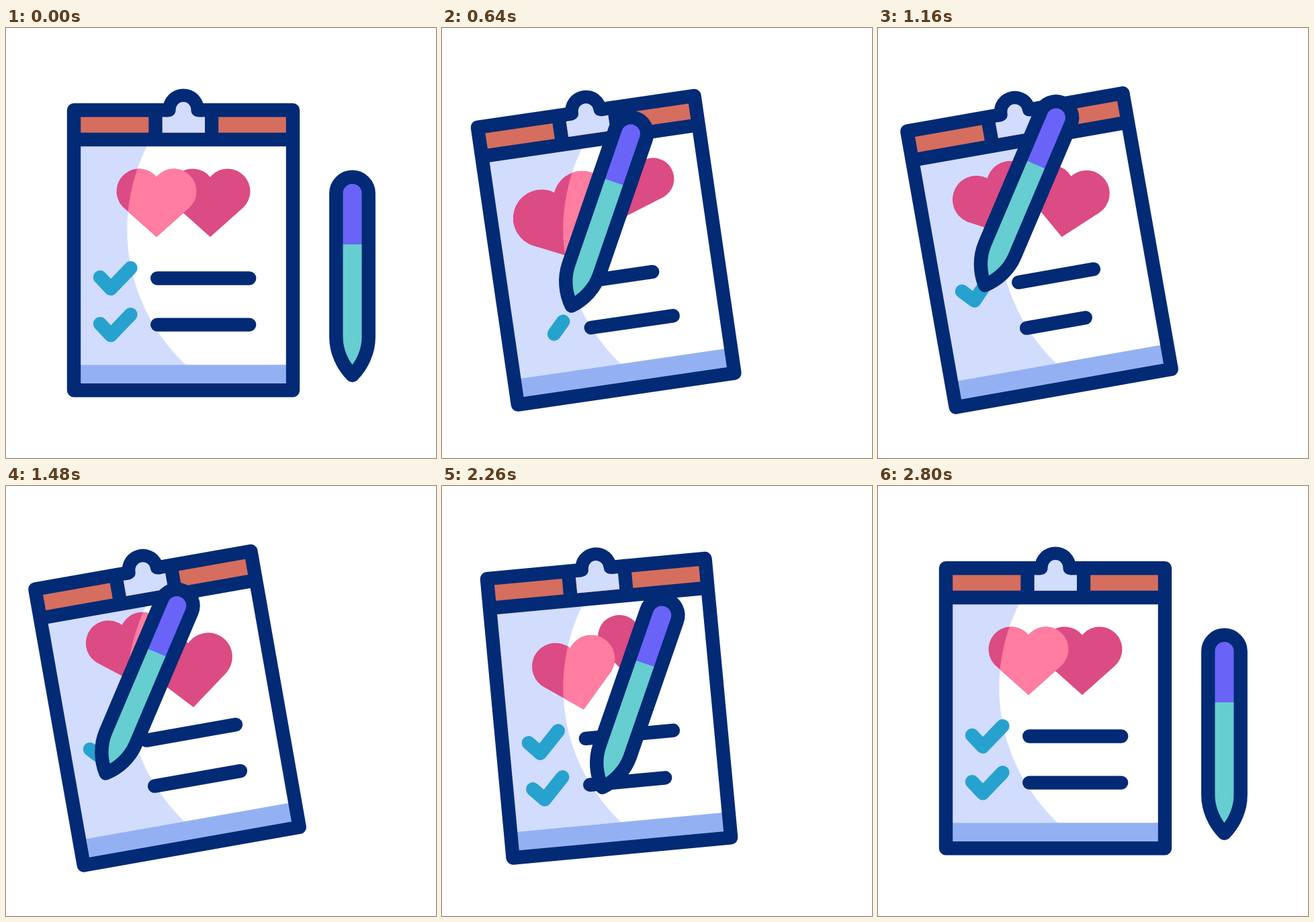
Animation, 640 px wide and 640 px high, one loop 3000 ms. Source, as an HTML page with a canvas:

```html
<!DOCTYPE html>
<html lang="en">
<head>
<meta charset="utf-8">
<title>Checklist</title>
<style>
  html, body { margin: 0; width: 100%; height: 100%; overflow: hidden; background: #fff; }
  canvas { display: block; width: 640px; height: 640px; }
</style>
</head>
<body>
<canvas id="stage" width="640" height="640"></canvas>
<script>
const ctx = document.getElementById('stage').getContext('2d');
const LOOP = 3000, LINE = 20.4, CORNER = 0.353;
const NAVY = '#032a75', PALE = '#d2dcfd', STRIPE = '#93b1f2', CORAL = '#d56e5e',
      PINK = '#ff7da0', ROSE = '#db4b84', CHECK = '#27a2ce', TEAL = '#66cdd1', PURPLE = '#6a63f8';

const clamp = (v, low, high) => Math.min(high, Math.max(low, v));
const mix = (a, b, u) => a + (b - a) * u;

function ease(t, from, to) {
  const u = clamp((t - from) / (to - from), 0, 1);
  return u * u * (3 - 2 * u);
}

// Rises to 1, stays, falls back to 0.
const hold = (t, start, up, leave, end) => ease(t, start, up) - ease(t, leave, end);
const pulse = (t, start, peak, end) => hold(t, start, peak, peak, end);

function rect(x, y, w, h, color) {
  ctx.fillStyle = color;
  ctx.fillRect(x, y, w, h);
}

function fill(path, color) {
  ctx.fillStyle = color;
  ctx.fill(path);
}

function stroke(path, color) {
  ctx.strokeStyle = color;
  ctx.lineWidth = LINE;
  ctx.lineCap = ctx.lineJoin = 'round';
  ctx.stroke(path);
}

function group(x, y, angle, scale, draw) {
  ctx.save();
  ctx.translate(x, y);
  ctx.rotate(angle * Math.PI / 180);
  ctx.scale(scale, scale);
  draw();
  ctx.restore();
}

function disc(x, y, radius) {
  const path = new Path2D();
  path.arc(x, y, radius, 0, 2 * Math.PI);
  return path;
}

const heart = new Path2D();
heart.moveTo(0, 46);
heart.arc(26, -22, 33.5, 0.8, -2.46, true);
heart.arc(-26, -22, 33.5, -0.68, Math.PI - 0.8, true);
heart.closePath();

const spot = disc(456.3, 300, 276);
const knob = disc(264, 121.4, 30.9);
const frame = new Path2D('M101 122.2H427V539.3H101ZM101 166H427M222.5 122V166M306 122V166');
const clip = new Path2D('M232.8 132.4H241Q252.6 131.5 252.6 121.5A11.4 11.4 0 0 1 275.4 121.5Q275.4 131.5 287 132.4H296V155.8H232.8Z');
// The pen's tip is its origin.
const barrel = new Path2D('M-24.2 -271A24.2 24.2 0 0 1 24.2 -271V-57C24.2 -36 15 -15 0 0C-15 -15 -24.2 -36 -24.2 -57Z');

const boardPose = (tilt, shift) => new DOMMatrix()
  .translate(264 - 24 * shift, 330.5).rotate(-10 * tilt).translate(-264, -330.5);
const tilted = boardPose(1, 1);

function onBoard(t, draw) {
  ctx.save();
  ctx.setTransform(boardPose(hold(t, 200, 800, 2060, 2480), hold(t, 200, 800, 2100, 2500)));
  draw();
  ctx.restore();
}

// Draws only what lies inside the fixed round highlight.
function inSpot(draw) {
  ctx.save();
  ctx.clip(spot);
  draw();
  ctx.restore();
}

const paper = color => rect(105, 170, 318, 331.3, color);

// Point on a check mark, p running from 0 at its short end to 1.
function checkPoint(top, p) {
  const short = Math.min(p, CORNER) / CORNER;
  const long = Math.max(p - CORNER, 0) / (1 - CORNER);
  return { x: 140 + 16 * short + 29.5 * long, y: top + 17 * short - 30.8 * long };
}

// The pen runs a little past the end of the mark.
const written = (t, begin) =>
  CORNER * ease(t, begin, begin + 200) + 0.72 * ease(t, begin + 200, begin + 490);

const marks = [{ top: 371, erase: 200, write: 800 }, { top: 440.2, erase: 400, write: 1600 }];

function checkMark(t, { top, erase, write }) {
  const from = t < write ? ease(t, erase, erase + 400) : 0;
  const to = t < write ? 1 : Math.min(1, written(t, write));
  if (to <= from) return;
  const path = new Path2D();
  for (const p of [from, clamp(CORNER, from, to), to]) {
    const { x, y } = checkPoint(top, p);
    path.lineTo(x, y);
  }
  stroke(path, CHECK);
}

function textLine(t, y) {
  const cut = 50 * pulse(t, 200, 900, 1400) + 31 * pulse(t, 1400, 1920, 2400);
  stroke(new Path2D(`M225.2 ${y}h${137 - cut}`), NAVY);
}

// The hearts swing up and down against each other while they turn.
function heartMotion(t) {
  const beat = (clamp(t, 800, 2000) - 800) / 600;
  return {
    swing: hold(t, 200, 800, 2000, 2600) * Math.cos(Math.PI * beat),
    turn: pulse(t, 200, 800, 1750) + 0.38 * pulse(t, 1750, 2200, 2600),
    grow: 0.33 * pulse(t, 200, 800, 1300) + 0.08 * pulse(t, 1400, 2000, 2600)
  };
}

function backHeart({ swing, turn }) {
  group(304 + 17 * turn, 265 - 24 * swing, 27.7 * turn, 1 - 0.08 * swing, () => fill(heart, ROSE));
}

function frontHeart({ swing, turn, grow }, color) {
  group(224 - 10 * turn, 265 + 27 * swing, -20 * turn, 1 + grow, () => fill(heart, color));
}

function pen(t) {
  const [a, b] = marks.map(({ top, write }) => checkPoint(top, written(t, write)));
  const next = ease(t, 1300, 1600);
  const tip = tilted.transformPoint({ x: mix(a.x, b.x, next), y: mix(a.y, b.y, next) });
  const away = hold(t, 200, 800, 2070, 2800);
  group(mix(515.5, tip.x, away), mix(517, tip.y, away), 23 * away, 1, () => {
    fill(barrel, TEAL);
    rect(-18, -289, 36, 94, PURPLE);
    stroke(barrel, NAVY);
  });
}

function render(t) {
  const motion = heartMotion(t);
  rect(0, 0, 640, 640, '#fff');
  onBoard(t, () => paper(PALE));
  inSpot(() => onBoard(t, () => paper('#fff')));
  onBoard(t, () => {
    rect(105, 501.3, 318, 34, STRIPE);
    rect(105, 126, 318, 36, CORAL);
    stroke(frame, NAVY);
    fill(knob, NAVY);
    fill(clip, PALE);
    backHeart(motion);
    frontHeart(motion, ROSE);
  });
  inSpot(() => onBoard(t, () => frontHeart(motion, PINK)));
  onBoard(t, () => {
    marks.forEach(mark => checkMark(t, mark));
    textLine(t, 372.5);
    textLine(t - 200, 441.6);
  });
  pen(t);
}

function tick() {
  render(performance.now() % LOOP);
  requestAnimationFrame(tick);
}
tick();
</script>
</body>
</html>
```
